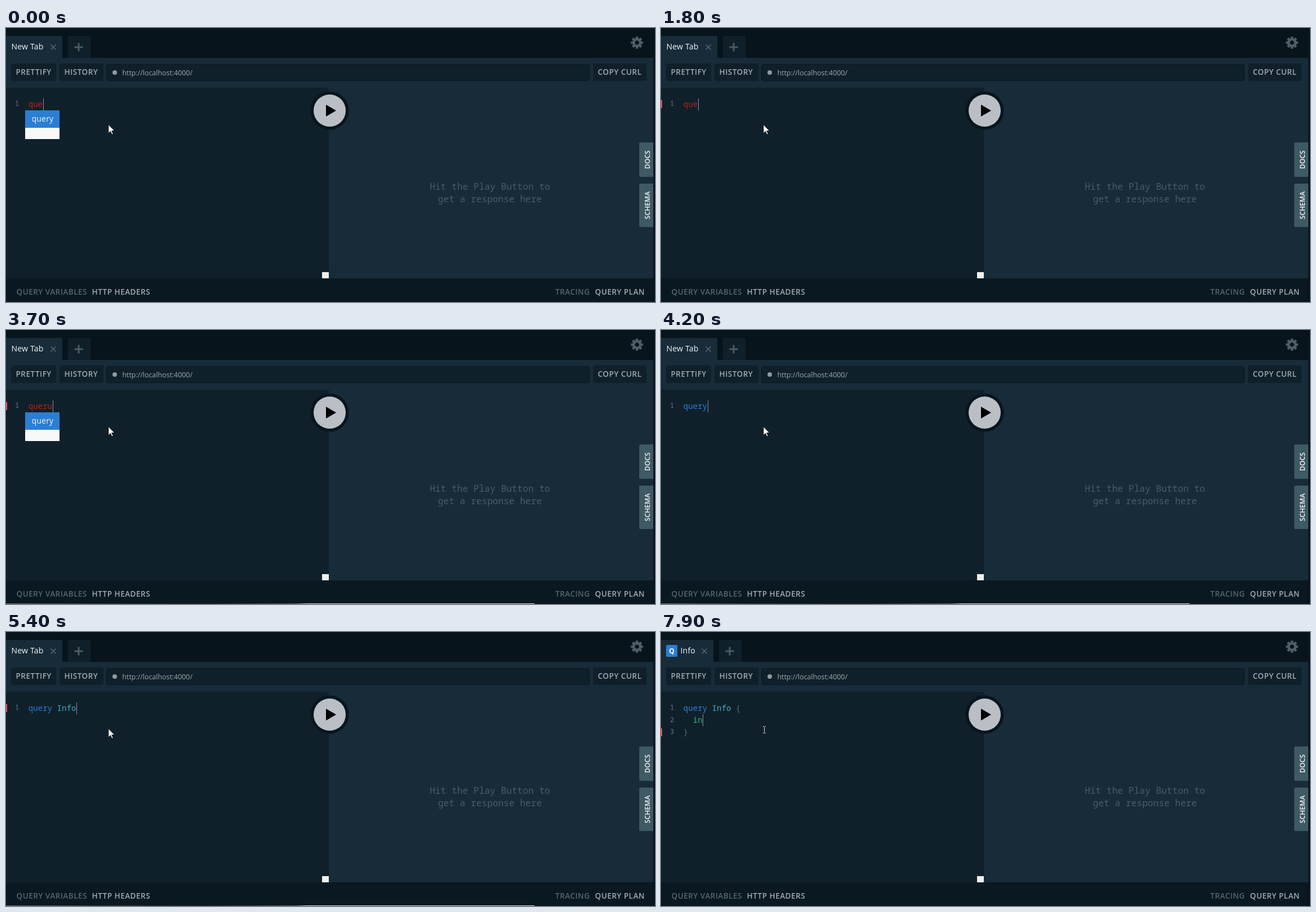
An HTML page that plays this animation: 1152 by 486 pixels, repeating every 8000 ms.

```html
<!DOCTYPE html>
<html lang="en">
<head>
<meta charset="utf-8">
<title>Query editor</title>
<style>
  html, body { margin: 0; width: 100%; height: 100%; overflow: hidden; background: #07141c; }
  svg { display: block; width: 1152px; height: 486px; }
  text { white-space: pre; }
  .ui { font: 400 14.1px "Open Sans", sans-serif; letter-spacing: .15px; fill: #f4f6f7; }
  .label { font: 600 13.5px "Open Sans", sans-serif; letter-spacing: .5px; fill: #a2abb0; }
  .dim { fill: #56656e; }
  .url { font: 400 12.4px "Open Sans", sans-serif; fill: #a0a9ae; }
  .side { font: 600 12px "Open Sans", sans-serif; letter-spacing: .1px; fill: #f4f6f7; text-anchor: middle; }
  .hint { font: 400 16.2px "Noto Sans Mono", monospace; fill: #4c5c67; text-anchor: middle; }
  .code { font: 400 14.1px "Noto Sans Mono", monospace; }
  .num { font: 400 12px "Noto Sans Mono", monospace; fill: #66747d; }
  .bad { fill: #b9201f; }
  .keyword { fill: #2a7ed3; }
  .name { fill: #38b3ba; }
  .brace { fill: #606e76; }
  .match { fill: #808b92; text-decoration: underline; }
  .field { fill: #29b973; }
</style>
</head>
<body>
<svg viewBox="0 0 1152 486">
  <defs>
    <linearGradient id="edge">
      <stop offset="0" stop-color="#7d776c"/>
      <stop offset=".19" stop-color="#4a3a25"/>
      <stop offset=".38" stop-color="#1b2226"/>
      <stop offset=".55" stop-color="#6d6b66"/>
      <stop offset=".57" stop-color="#ebe7df"/>
      <stop offset="1" stop-color="#ebe7df"/>
    </linearGradient>
  </defs>

  <rect width="1152" height="486" fill="#07141c"/>
  <rect y="53" width="1149" height="391" fill="#172b39"/>
  <rect y="106" width="573" height="338" fill="#0f202b"/>
  <rect y="444" width="1147" height="42" fill="#0a1821"/>

  <!-- tabs -->
  <path id="tab" fill="#172b39"/>
  <g id="badge">
    <rect x="9" y="23" width="20" height="21" rx="2" fill="#2a7ed3"/>
    <text x="19" y="38" text-anchor="middle" font-family="Open Sans, sans-serif" font-weight="700" font-size="12" fill="#fff">Q</text>
  </g>
  <text id="title" class="ui" y="38"></text>
  <path id="close" d="M-4.5-4.5l9 9m0-9l-9 9" stroke="#5f6e78" stroke-width="1.3"/>
  <g id="add">
    <path d="M-19 19v-37q0-2 2-2h36q2 0 2 2v37z" fill="#0f202b"/>
    <path d="M-7.5 0h15M0-7.5v15" stroke="#4b5a63" stroke-width="3"/>
  </g>
  <g id="gear" transform="translate(1120 26)" fill="none" stroke="#4f5d66"></g>

  <!-- toolbar -->
  <g fill="#0f202b">
    <rect x="9" y="63" width="80" height="31" rx="2"/>
    <rect x="95" y="63" width="78" height="31" rx="2"/>
    <rect x="1042" y="63" width="95" height="31" rx="2"/>
    <rect x="178.500" y="64.500" width="857" height="29" rx="3" stroke="#09161e"/>
  </g>
  <text class="label" x="17.500" y="82.500">PRETTIFY</text>
  <text class="label" x="103.500" y="82.500">HISTORY</text>
  <text class="label" x="1050.500" y="82.500">COPY CURL</text>
  <circle cx="193" cy="79" r="4" fill="#8f999f"/>
  <text class="url" x="206.500" y="83.500">http://localhost:4000/</text>

  <!-- editor -->
  <rect id="error" width="2" height="14" fill="#ff4f56"/>
  <g id="numbers"></g>
  <g id="lines"></g>
  <rect id="caret" width="1" height="21" fill="#84919a"/>
  <g id="popup">
    <rect x="34" y="146" width="61" height="31" fill="#2a7ed3"/>
    <rect x="34" y="177" width="61" height="20" fill="#f7f9f9"/>
    <text class="ui" x="45.500" y="166">query</text>
  </g>
  <rect x="561" y="433" width="12" height="11" fill="#f0f0ec"/>

  <!-- response -->
  <text class="hint" x="859" y="287">Hit the Play Button to</text>
  <text class="hint" x="859" y="309">get a response here</text>
  <circle cx="574.500" cy="146.500" r="34" fill="#08151d"/>
  <circle cx="574.500" cy="146.500" r="28.500" fill="#b9bfc5"/>
  <path d="M568 136l18 10.500l-18 10.500z"/>

  <!-- side tabs -->
  <g fill="#3f5965">
    <path d="M1149 203h-23q-2 0-2 2v57q0 2 2 2h23z"/>
    <path d="M1149 276h-23q-2 0-2 2v73q0 2 2 2h23z"/>
  </g>
  <text class="side" transform="translate(1142.500 233.500) rotate(-90)">DOCS</text>
  <text class="side" transform="translate(1142.500 314.500) rotate(-90)">SCHEMA</text>

  <!-- footer -->
  <text class="label dim" x="18.500" y="472.500">QUERY VARIABLES</text>
  <text class="label" x="152.500" y="472.500">HTTP HEADERS</text>
  <text class="label dim" x="975" y="472.500">TRACING</text>
  <text class="label" x="1045.500" y="472.500">QUERY PLAN</text>
  <rect id="line" y="485" width="938" height="1" fill="url(#edge)"/>

  <!-- pointers -->
  <path id="arrow" d="M181.500 171v15.500l3.600-3.400l2.500 5.600l2.400-1l-2.500-5.500h5z"
        transform="translate(.3 .3)" fill="#fff" stroke="#05090c" stroke-width="1"/>
  <path id="beam" d="M181 167.500h1.500l1 1l1-1h1.500M183.500 168.500v10M181 179.500h1.500l1-1l1 1h1.500"
        fill="none" stroke="#d8dcde"/>
</svg>
<script>
const LOOP = 8000, FRAME = 100, BLINK = 530;
const CELL = 8.46, LEFT = 39.8, PITCH = 21.3;
const $ = id => document.getElementById(id);

// key time, text, caret row, caret column
const keys = [
  [-470, "que", 0, 3],
  [2400, "quer", 0, 4],
  [2600, "queru", 0, 5],
  [3900, "quer", 0, 4],
  [4100, "query", 0, 5],
  [4500, "query ", 0, 6],
  [4700, "query I", 0, 7],
  [4800, "query In", 0, 8],
  [5000, "query Inf", 0, 9],
  [5100, "query Info", 0, 10],
  [5670, "query Info ", 0, 11],
  [6400, "query Info {}", 0, 12],
  [6670, "query Info {\n  \n}", 1, 2],
  [7700, "query Info {\n  i\n}", 1, 3],
  [7800, "query Info {\n  in\n}", 1, 4]
];
// row of the error bar, -1 for none
const errors = [[0, -1], [600, 0], [4100, -1], [4800, 0], [6700, 2]];

const at = (steps, t) => steps.filter(s => s[0] <= t).pop();
const within = (t, from, to) => t >= from && t < to;
const show = (id, on) => $(id).setAttribute("visibility", on ? "visible" : "hidden");
const move = (id, x, y) => $(id).setAttribute("transform", `translate(${x} ${y})`);
const span = (kind, s) => s ? `<tspan class="${kind}">${s}</tspan>` : "";

function paint(row) {
  if (row.startsWith("query")) {
    const [, name, braces] = row.slice(5).match(/^([^{]*)(.*)$/);
    return span("keyword", "query") + span("name", name) +
      span(braces === "{}" ? "match" : "brace", braces);
  }
  return span(row === "}" ? "brace" : row[0] === " " ? "field" : "bad", row);
}

function setText(text) {
  const rows = text.split("\n");
  $("lines").innerHTML = rows.map((r, i) =>
    `<text class="code" x="${LEFT}" y="${139.7 + i * PITCH}">${paint(r)}</text>`).join("");
  $("numbers").innerHTML = rows.map((r, i) =>
    `<text class="num" x="16" y="${138.3 + i * PITCH}">${i + 1}</text>`).join("");
}

function setTab(named) {
  const w = named ? 93 : 100;
  $("tab").setAttribute("d", `M0 14H${w - 2}q2 0 2 2V53H0z`);
  $("title").textContent = named ? "Info" : "New Tab";
  $("title").setAttribute("x", named ? 34.5 : 9.5);
  move("close", w - 16, 34);
  move("add", w + 29, 34);
  show("badge", named);
}

function drawGear() {
  let teeth = "";
  for (let a = 0; a < 360; a += 45)
    teeth += `<path d="M0-7v-3.700" stroke-width="4.500" transform="rotate(${a})"/>`;
  $("gear").innerHTML = `<circle r="5.900" stroke-width="4.400"/>` + teeth;
}

let shown = null;
function render(now) {
  const t = Math.floor((now % LOOP) / FRAME) * FRAME;
  if (t !== shown) {
    shown = t;
    const [typed, text, row, col] = at(keys, t);
    const bar = at(errors, t)[1];
    setText(text);
    setTab(t >= 7700);
    $("caret").setAttribute("x", Math.round(LEFT + 0.4 + col * CELL));
    $("caret").setAttribute("y", Math.round(125 + row * PITCH));
    show("caret", Math.floor((t - typed) / BLINK) % 2 === 0);
    $("error").setAttribute("y", Math.round(128 + bar * PITCH));
    show("error", bar >= 0);
    show("popup", t < 600 || within(t, 2600, 4100));
    show("line", within(t, 2600, 6000));
    show("arrow", t < 6700);
    show("beam", t >= 6700);
  }
}

drawGear();
const start = performance.now();
function tick() {
  render(performance.now() - start);
  requestAnimationFrame(tick);
}
tick();
</script>
</body>
</html>
```
